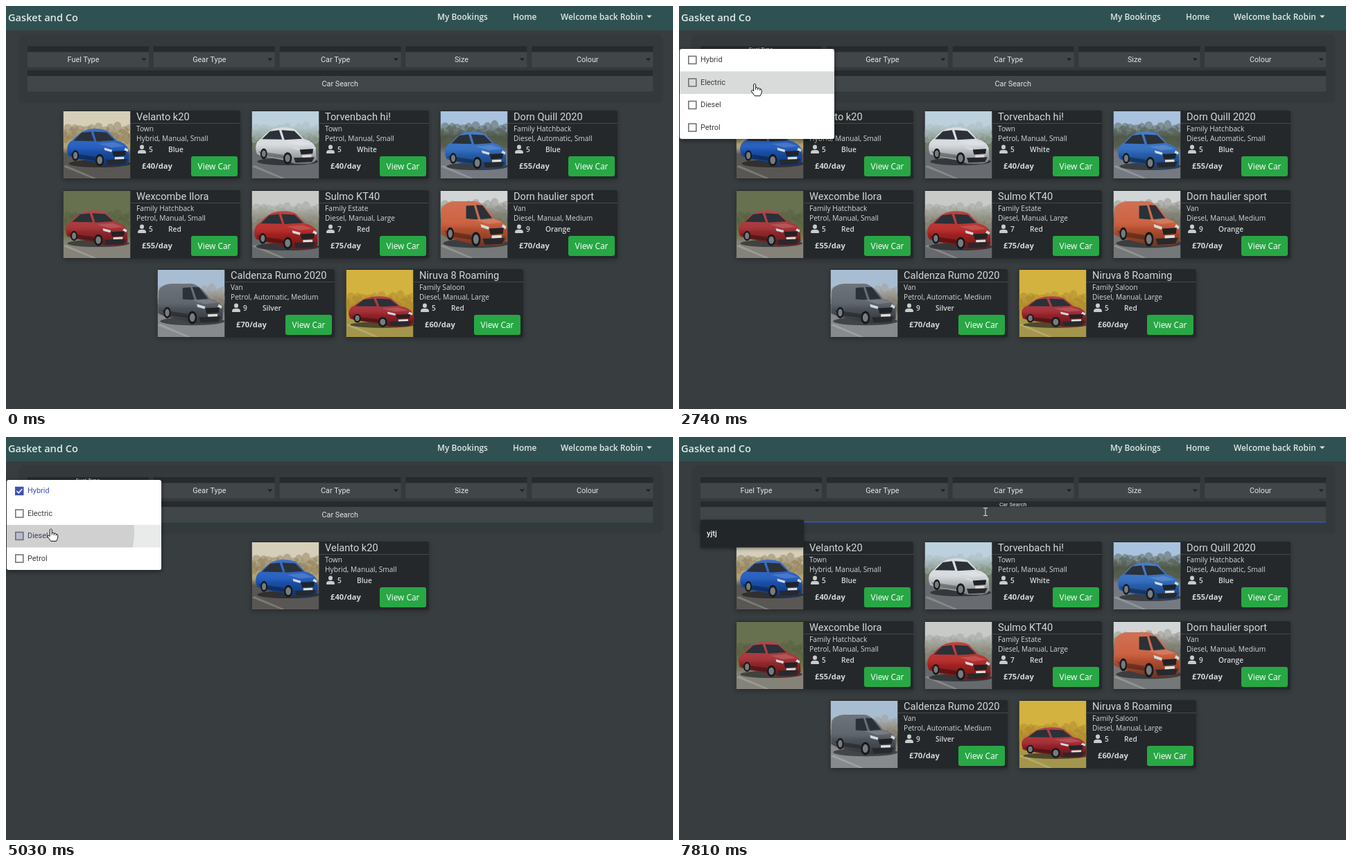
Recreate the animation shown at these times as an HTML page with a canvas. Size 962 by 582 pixels, loop 8000 ms.

```html
<!DOCTYPE html>
<html lang="en">
<head>
<meta charset="utf-8">
<title>Car hire search</title>
<style>
html, body { margin: 0; width: 100%; height: 100%; overflow: hidden; background: #383d40; }
canvas { display: block; }
</style>
</head>
<body>
<canvas id="stage" width="962" height="582"></canvas>
<script>
const ctx = document.getElementById('stage').getContext('2d');
const LOOP = 8000;
const SANS = '"Open Sans", "Noto Sans", sans-serif';
const ROBOTO = 'Roboto, Arial, sans-serif';
const INDIGO = '#3f51b5';

// scene: sky, far, ground, trees, paint, horizon, then car box x, y, w, h
const cars = [
  { name: 'Velanto k20', type: 'Town', spec: 'Hybrid, Manual, Small', seats: 5, colour: 'Blue', price: 40,
    scene: ['#d5cfba', '#b3a274', '#595754', '#8b7856', '#1d58bd', .5, 5, 25, 90, 55] },
  { name: 'Torvenbach hi!', type: 'Town', spec: 'Petrol, Manual, Small', seats: 5, colour: 'White', price: 40,
    scene: ['#bcd0dd', '#6d7b68', '#686c70', '#a9b8b6', '#d5d9dd', .5, 5, 23, 88, 54] },
  { name: 'Dorn Quill 2020', type: 'Family Hatchback', spec: 'Diesel, Automatic, Small', seats: 5, colour: 'Blue', price: 55,
    scene: ['#a9c2de', '#555d4c', '#757a82', '#4c5546', '#2b68bd', .48, 6, 29, 89, 55] },
  { name: 'Wexcombe Ilora', type: 'Family Hatchback', spec: 'Petrol, Manual, Small', seats: 5, colour: 'Red', price: 55,
    scene: ['#67704f', '#6c744d', '#858379', '#525e3e', '#a32c30', .62, 3, 28, 90, 52] },
  { name: 'Sulmo KT40', type: 'Family Estate', spec: 'Diesel, Manual, Large', seats: 7, colour: 'Red', price: 75,
    scene: ['#c8cac8', '#858373', '#666a6c', '#9c9d94', '#b32523', .5, 3, 29, 92, 56] },
  { name: 'Dorn haulier sport', type: 'Van', spec: 'Diesel, Manual, Medium', seats: 9, colour: 'Orange', price: 70, van: true,
    scene: ['#d2d5d5', '#77786a', '#757878', '#898b80', '#c95a37', .45, 1, 15, 95, 66] },
  { name: 'Caldenza Rumo 2020', type: 'Van', spec: 'Petrol, Automatic, Medium', seats: 9, colour: 'Silver', price: 70, van: true,
    scene: ['#a8bdd2', '#756e62', '#878a8d', '#a0978b', '#575d66', .55, 1, 20, 93, 59] },
  { name: 'Niruva 8 Roaming', type: 'Family Saloon', spec: 'Diesel, Manual, Large', seats: 5, colour: 'Red', price: 60,
    scene: ['#d3b23f', '#b99a33', '#a3964c', '#a8842a', '#a3262e', .65, 3, 38, 94, 45] }
];

const fuels = ['Hybrid', 'Electric', 'Diesel', 'Petrol'];
const OPEN = 1240, CLOSE = 6420, SEARCH = 7360;
// time, option, x, y
const clicks = [
  [1880, 1, 110, 115], [2420, 1, 110, 115], [3070, 0, 92, 83],
  [3690, 2, 64, 137], [4950, 2, 64, 137], [5370, 0, 78, 70]
];
// time, x, y, shape
const path = [
  [220, 480, 590, 'arrow'], [960, 184, 77, 'hand'], [1100, 174, 76, 'hand'], [1240, 150, 78, 'hand'],
  [1710, 111, 115, 'hand'], [2670, 111, 115, 'hand'], [3040, 92, 82, 'hand'], [3250, 92, 82, 'hand'],
  [3670, 64, 136, 'hand'], [4980, 64, 136, 'hand'], [5340, 77, 70, 'hand'], [5800, 77, 70, 'hand'],
  [6000, 226, 90, 'arrow'], [6380, 379, 105, 'arrow'], [6620, 379, 105, 'text'], [7330, 442, 108, 'text']
];
const cursors = {
  arrow: new Path2D('M0 0V12L3 9.5L5 14L7 13L5 9H9Z'),
  hand: new Path2D('M-1.5 1.5Q0-1 1.5 1.5V6Q4 5 4.5 7Q7 6 7.5 8Q10 7.5 10 10V13Q9 16 8 18H0Q-3 14-5 11Q-4 8-1.5 11Z'),
  text: new Path2D('M-3-5.5H-1L0-5L1-5.5H3M0-5V5M-3 5.5H-1L0 5L1 5.5H3')
};
const bodies = {
  car: new Path2D('M.03 .72C-.02 .5 .02 .36 .1 .3Q.22 .06 .36 .02Q.54-.03 .66 .07L.8 .32Q.95 .37 .99 .55L1 .85Q.97 .96 .88 .97H.64L.52 .9L.12 .78Z'),
  van: new Path2D('M0 .72L.01 .16Q.05 .02 .2 0H.52Q.66 .04 .8 .37Q.96 .44 1 .58V.86L.92 .96L.6 .98L.1 .8Z')
};

const clamp = v => Math.max(0, Math.min(1, v));
const ease = v => 1 - (1 - clamp(v)) ** 3;
const mix = (a, b, p) => a + (b - a) * p;

function rect(x, y, w, h, fill, r = 0) {
  ctx.fillStyle = fill;
  ctx.beginPath();
  ctx.roundRect(x, y, w, h, r);
  ctx.fill();
}

function text(s, x, y, font, fill, align = 'left') {
  ctx.font = font;
  ctx.fillStyle = fill;
  ctx.textAlign = align;
  ctx.fillText(s, x, y);
}

function poly(points, fill) {
  ctx.fillStyle = fill;
  ctx.beginPath();
  for (let i = 0; i < points.length; i += 2) ctx.lineTo(points[i], points[i + 1]);
  ctx.fill();
}

function oval(x, y, rx, ry, fill) {
  ctx.fillStyle = fill;
  ctx.beginPath();
  ctx.ellipse(x, y, rx, ry, 0, 0, 7);
  ctx.fill();
}

function fade(height, ...stops) {
  const g = ctx.createLinearGradient(0, 0, 0, height);
  for (const [at, colour] of stops) g.addColorStop(at, colour);
  return g;
}

function shadow(blur, alpha, dy = 2) {
  ctx.shadowColor = `rgba(0,0,0,${alpha})`;
  ctx.shadowBlur = blur;
  ctx.shadowOffsetY = dy;
}

function photo(x, y, { scene, van }) {
  const [sky, far, ground, trees, paint, horizon, cx, cy, cw, ch] = scene;
  ctx.save();
  ctx.translate(x, y);
  ctx.beginPath();
  ctx.rect(0, 0, 97, 97);
  ctx.clip();
  rect(0, 0, 97, 97, fade(97, [0, sky], [horizon - .25, sky], [horizon - .1, far],
    [horizon + .04, far], [horizon + .14, ground], [1, ground]));
  ctx.globalAlpha = .45;
  for (let i = 0; i < 30; i++)
    oval(i * 3.4, horizon * 97 - 17 + 8 * Math.sin(i * 2.4), 6, 6 + 3 * Math.sin(i * 1.7), trees);
  ctx.globalAlpha = 1;
  poly([0, 80, 4, 78, 48, 97, 42, 97], 'rgba(225,225,215,.25)');

  ctx.translate(cx, cy);
  ctx.scale(cw, ch);
  oval(.53, .92, .5, .1, 'rgba(20,22,24,.6)');
  const body = van ? bodies.van : bodies.car;
  ctx.fillStyle = paint;
  ctx.fill(body);
  ctx.fillStyle = fade(1, [0, 'rgba(255,255,255,.14)'], [.45, 'rgba(255,255,255,.06)'], [.6, 'rgba(0,0,0,.1)'], [1, 'rgba(0,0,0,.45)']);
  ctx.fill(body);
  const glass = '#2a3138';
  poly(van ? [.38, .1, .5, .09, .56, .4, .38, .38] : [.11, .32, .24, .11, .39, .08, .44, .33], glass);
  poly(van ? [.53, .08, .63, .09, .78, .38, .6, .4] : [.43, .08, .64, .1, .77, .31, .48, .34], glass);
  poly([.51, .4, .76, .36, .93, .46, .72, .5], 'rgba(255,255,255,.14)');
  poly([.05, .64, .46, .74, .46, .84, .1, .76], 'rgba(0,0,0,.3)');
  for (const [wx, wy, rx, ry] of [[.14, .71, .055, .14], [.53, .83, .07, .16]]) {
    oval(wx, wy, rx, ry, '#17191b');
    oval(wx, wy, rx * .6, ry * .65, '#777c80');
  }
  poly([.6, .5, .73, .56, .72, .62, .61, .57], '#d2d9dd');
  poly([.94, .5, .99, .55, .98, .61, .92, .57], '#d2d9dd');
  poly([.73, .6, .95, .58, .94, .71, .75, .73], '#202326');
  poly([.63, .82, .97, .8, .93, .93, .66, .95], '#26292d');
  poly([.77, .75, .92, .74, .92, .8, .77, .81], '#dedfda');
  ctx.restore();
}

function card(x, y, car) {
  ctx.save();
  shadow(7, .28);
  rect(x, y, 256, 98.5, '#24282a', 3);
  ctx.restore();
  photo(x + .5, y + 1, car);
  const left = x + 106, pale = '#d4d7d8';
  text(car.name, left, y + 14, '14.6px ' + ROBOTO, pale);
  rect(x + 98, y + 18, 158, 1, '#434a4c');
  text(car.type, left, y + 30, '10.2px ' + SANS, pale);
  text(car.spec, left, y + 44, '10.2px ' + SANS, pale);
  oval(x + 114, y + 52.7, 3, 3.2, '#c9cccd');
  rect(x + 108, y + 57, 12, 5, '#c9cccd', [4, 4, 1, 1]);
  const bold = '600 10.2px ' + SANS;
  text(car.seats, x + 124, y + 59.7, bold, pale);
  text(car.colour, x + 152, y + 59.7, bold, pale);
  text(`£${car.price}/day`, x + 114, y + 84, '700 11.2px ' + SANS, pale);
  rect(x + 185, y + 66, 67, 29, '#28a745', 3);
  text('View Car', x + 218.5, y + 85, '11.9px ' + SANS, '#fff', 'center');
}

function cardList(t) {
  const chosen = fuels.filter((_, i) => isOn(i, t));
  const shown = cars.filter(c => !chosen.length || chosen.some(f => c.spec.startsWith(f)));
  shown.forEach((car, i) => {
    const row = Math.floor(i / 3), count = Math.min(3, shown.length - row * 3);
    card(490 - count * 136 + (i % 3) * 272, 151 + Math.round(row * 114.6), car);
  });
}

const isOn = (option, t) => clicks.filter(c => c[1] === option && c[0] <= t).length % 2 === 1;

function floatLabel(s, p, home, up) {
  text(s, mix(home[0], up[0], p), mix(home[1], up[1], p), `${mix(10.8, 8.1, p)}px ${ROBOTO}`, '#e2e4e5', 'center');
}

function page(t) {
  rect(0, 0, 962, 582, '#383d40');
  rect(0, 0, 962, 35, '#2f5152');
  const link = '600 11.9px ' + SANS, pale = '#dfe9e9';
  text('Gasket and Co', 3, 21.5, '600 14.6px ' + SANS, pale);
  text('My Bookings', 622, 20, link, pale);
  text('Home', 731, 20, link, pale);
  text('Welcome back Robin', 800, 20, link, pale);
  poly([924, 13.5, 931.5, 13.5, 927.8, 17.3], pale);

  ctx.save();
  shadow(4, .15, 0);
  rect(20, 43, 925, 95, '#34393b', 6);
  ctx.restore();
  const lifted = ease((t - OPEN) / 250) * (1 - ease((t - CLOSE) / 200));
  ['Fuel Type', 'Gear Type', 'Car Type', 'Size', 'Colour'].forEach((label, i) => {
    const x = 31 + i * 181.8;
    rect(x, 58, 175, 8.5, '#272b2d');
    rect(x, 66.5, 175, 22, '#414648');
    poly([x + 164.5, 75.5, x + 171.5, 75.5, x + 168, 79.3], '#1d2021');
    floatLabel(label, i ? 0 : lifted, [x + 80.5, 81], [x + 87, 64.5]);
  });
  rect(31, 93, 902, 8, '#272b2d');
  rect(31, 101, 902, 22, '#414648');
  rect(31, 122.5, 902, 1, '#2f5152');
  const focus = ease((t - SEARCH) / 260);
  if (focus) rect(482 - 451 * focus, 122, 902 * focus, 1.5, INDIGO);
  floatLabel('Car Search', focus, [481.7, 116], [481.7, 100]);
}

function optionPanel(t) {
  if (t < OPEN || t > CLOSE + 100) return;
  const grow = ease((t - OPEN) / 120);
  ctx.save();
  ctx.globalAlpha = grow * (1 - clamp((t - CLOSE) / 100));
  ctx.translate(0, 77 * (1 - grow));
  ctx.scale(1, grow || .01);
  ctx.save();
  shadow(7, .45);
  rect(1, 62, 223, 130, '#fff', 3);
  ctx.restore();
  ctx.beginPath();
  ctx.roundRect(1, 62, 223, 130, 3);
  ctx.clip();

  const [mx, my] = pointer(t);
  const active = clicks.filter(c => c[0] < t - 100).pop();
  fuels.forEach((fuel, i) => {
    const y = 62 + i * 32.5;
    const hover = mx > 1 && mx < 224 && my >= y && my < y + 32.5;
    if (active && active[1] === i) rect(1, y, 223, 32.5, '#e9eaea');
    else if (hover) rect(1, y, 223, 32.5, '#f4f4f4');

    ctx.save();
    ctx.beginPath();
    ctx.rect(1, y, 223, 32.5);
    ctx.clip();
    for (const [start, option, cx, cy] of clicks) {
      const age = t - start;
      if (option !== i || age < 0 || age > 550) continue;
      const r = Math.hypot(Math.max(cx, 224 - cx), 24) * ease(age / 220);
      oval(cx, cy, r, r, `rgba(0,0,0,${.11 * (1 - clamp((age - 200) / 350))})`);
    }
    ctx.restore();

    const last = clicks.filter(c => c[1] === i && c[0] <= t).pop();
    const change = last ? clamp((t - last[0]) / 110) : 1;
    const on = isOn(i, t) ? change : 1 - change;
    ctx.strokeStyle = on === 1 ? INDIGO : '#6c6c6c';
    ctx.lineWidth = 1.5;
    ctx.strokeRect(13.8, y + 10.5, 11, 11);
    rect(13.8, y + 10.5, 11, 11, `rgba(63,81,181,${on === 1 ? 1 : on * .6})`);
    if (on === 1) {
      ctx.strokeStyle = '#fff';
      ctx.stroke(new Path2D(`M15.5 ${y + 16}l2.7 2.8l5-5.6`));
    }
    const ink = `rgb(${mix(58, 63, on)},${mix(58, 81, on)},${mix(60, 181, on)})`;
    text(fuel, 31, y + 19.2, '10.9px ' + ROBOTO, ink);
  });
  ctx.restore();
}

function suggestion(t) {
  if (t < 7500) return;
  ctx.save();
  shadow(5, .4);
  rect(31, 119.5, 149, 40, '#222628', 2);
  ctx.restore();
  text('yjtj', 40, 143, '500 11.2px ' + ROBOTO, '#f0f0f0');
}

function pointer(t) {
  const i = path.findIndex(k => k[0] > t);
  if (i < 0) return path[path.length - 1].slice(1);
  if (!i) return [-50, -50, 'arrow'];
  const a = path[i - 1], b = path[i];
  let p = (t - a[0]) / (b[0] - a[0]);
  p = p * p * (3 - 2 * p);
  return [mix(a[1], b[1], p), mix(a[2], b[2], p), a[3]];
}

function cursor(t) {
  const [x, y, shape] = pointer(t);
  ctx.save();
  ctx.translate(x, y);
  ctx.lineWidth = 1;
  ctx.strokeStyle = shape === 'text' ? '#e6e6e6' : '#111';
  if (shape !== 'text') {
    ctx.fillStyle = '#fff';
    ctx.fill(cursors[shape]);
  }
  ctx.stroke(cursors[shape]);
  if (shape === 'hand') ctx.stroke(new Path2D('M1.5 6V9M4.5 7V9.5M7.5 8V10'));
  ctx.restore();
}

function draw(now) {
  const t = now % LOOP;
  page(t);
  cardList(t);
  optionPanel(t);
  suggestion(t);
  cursor(t);
  requestAnimationFrame(draw);
}
requestAnimationFrame(draw);
</script>
</body>
</html>
```
